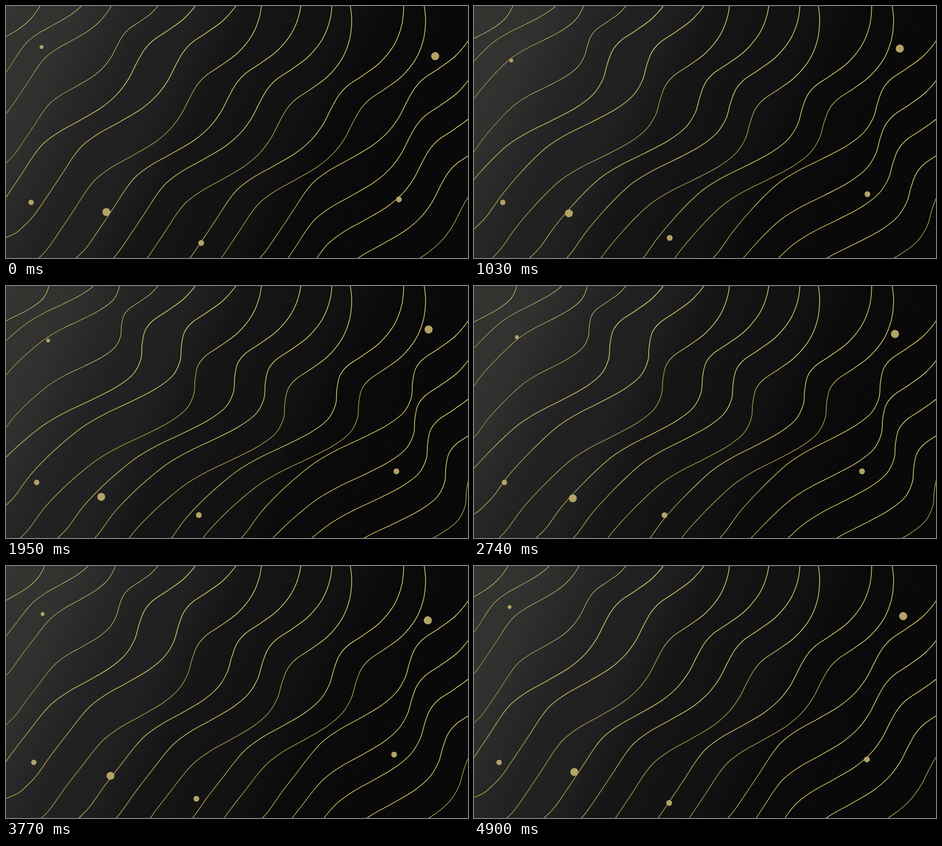
Write an HTML page that moves like this. It is 1013 px wide and 553 px high and loops after 4940 ms.

```html
<!DOCTYPE html>
<html lang="en">
<head>
<meta charset="utf-8">
<title>Golden waves</title>
<style>
  html, body { margin: 0; width: 100%; height: 100%; overflow: hidden; background: #0b0b0b; }
  svg { display: block; width: 100vw; height: 100vh; }
  use { fill: none; stroke: url(#bright); stroke-width: 1.75px; }
  use.dull { stroke: url(#dull); }
  circle { fill: #b2a366; }
</style>
</head>
<body>
<svg id="stage" viewBox="0 0 1013 553" preserveAspectRatio="none">
  <defs>
    <linearGradient id="night" gradientUnits="userSpaceOnUse" x1="0" y1="0" x2="1035" y2="495">
      <stop offset="0" stop-color="#343431"/>
      <stop offset=".12" stop-color="#31312f"/>
      <stop offset=".19" stop-color="#282828"/>
      <stop offset=".25" stop-color="#222222"/>
      <stop offset=".34" stop-color="#202020"/>
      <stop offset=".42" stop-color="#151515"/>
      <stop offset=".6" stop-color="#111111"/>
      <stop offset=".67" stop-color="#0a0a0a"/>
      <stop offset="1" stop-color="#080808"/>
    </linearGradient>
    <linearGradient id="bright" gradientUnits="userSpaceOnUse" x1="0" y1="150" x2="0" y2="300">
      <stop offset="0" stop-color="#cbbb66"/>
      <stop offset="1" stop-color="#a8964b"/>
    </linearGradient>
    <linearGradient id="dull" gradientUnits="userSpaceOnUse" x1="0" y1="-60" x2="0" y2="40">
      <stop offset="0" stop-color="#cbbb66"/>
      <stop offset="1" stop-color="#9c8a47"/>
    </linearGradient>
    <path id="wave"/>
  </defs>
  <rect width="1013" height="553" fill="url(#night)"/>
</svg>
<script>
const LOOP = 4940, MOVE = 4900;
const stage = document.getElementById("stage");
const wave = document.getElementById("wave");
const dots = [];

function add(tag, attrs) {
  const node = document.createElementNS("http://www.w3.org/2000/svg", tag);
  for (const key in attrs) node.setAttribute(key, attrs[key]);
  return stage.appendChild(node);
}

const points = text => text.split(" ").map(p => p.split(",").map(Number));

function smooth(from, to, v) {
  const u = Math.min(1, Math.max(0, (v - from) / (to - from)));
  return u * u * (3 - 2 * u);
}

// Steady rise to 1 at the peak time, then steady fall to 0 at the end time.
const swing = (t, peak, end) => Math.max(0, Math.min(t / peak, (end - t) / (end - peak)));

// One wave at rest, measured from its still shoulder at 0,0.
const shape = points("115,-225 120,-205 123,-172 118,-130 101,-88 70,-50 34,-23 0,0 -20,22 "
  + "-37,52 -54,85 -79,118 -113,147 -160,175 -205,200 -240,226 -262,253 -286,290 "
  + "-316,335 -347,380 -368,402 -390,420 -440,440");

// The belly leans right and comes back slowly; the tail leans left and returns sooner.
function sway([x, y], t) {
  const belly = 45 * smooth(0, 130, y) * (1 - .7 * smooth(200, 360, y));
  const tail = 61 * smooth(90, 330, y);
  return [x + belly * swing(t, 2300, MOVE) - tail * swing(t, 1650, 3700), y];
}

function curve(p) {
  let d = "M" + p[0];
  for (let i = 0; i < p.length - 1; i++) {
    const a = p[i - 1] || p[i], b = p[i], c = p[i + 1], e = p[i + 2] || c;
    d += "C" + [0, 1].map(k => b[k] + (c[k] - a[k]) / 6)
      + " " + [0, 1].map(k => c[k] - (e[k] - b[k]) / 6) + " " + c;
  }
  return d;
}

function strand(x, y, scale = 1, kind = "") {
  add("use", { href: "#wave", class: kind, transform: `translate(${x} ${y}) scale(${scale})` });
}

// A dot drifts round a closed path through four places, a quarter of the time apart.
function dot(r, path) {
  dots.push({ node: add("circle", { r }), path: points(path) });
}

function drift(path, t) {
  const i = Math.floor(t / MOVE * 4), u = t / MOVE * 4 - i;
  const at = n => path[(i + n + 4) % 4];
  return [0, 1].map(k => {
    const a = at(-1)[k], b = at(0)[k], c = at(1)[k], e = at(2)[k];
    return b + u / 2 * (c - a + u * (2 * a - 5 * b + 4 * c - e + u * (3 * (b - c) + e - a)));
  });
}

strand(113, -60, .75);
strand(228, -92, .75);
strand(267, -57, .75);
strand(270, 50, .72);
strand(322, 76);
strand(408, 80);
strand(438, 153, 1, "dull");
strand(525, 148);
strand(592, 162);
strand(635, 205, 1, "dull");
strand(749, 175);
strand(797, 205, 1, "dull");
strand(915, 160);
strand(920, 240);
strand(948, 294);
strand(988, 346);
strand(1033, 398, 1, "dull");

dot(4.3, "78,90 83,123 96,114 81,106.5");
dot(8.9, "941,110 932,92 924,101 924,119");
dot(6.4, "861.5,424.5 862,411 852,406 850.5,413");
dot(6.4, "428,520 428.5,507 419,502 417,510");
dot(5.9, "55,431 64.5,431 67.5,431 61.5,431");
dot(8.7, "220,452 207,456 213,466 229,461");

function draw(now) {
  const t = Math.min(now % LOOP, MOVE - .001);
  wave.setAttribute("d", curve(shape.map(p => sway(p, t))));
  for (const { node, path } of dots) {
    const [x, y] = drift(path, t);
    node.setAttribute("cx", x);
    node.setAttribute("cy", y);
  }
}

const start = performance.now();
function tick() {
  draw(performance.now() - start);
  requestAnimationFrame(tick);
}
tick();
</script>
</body>
</html>
```
